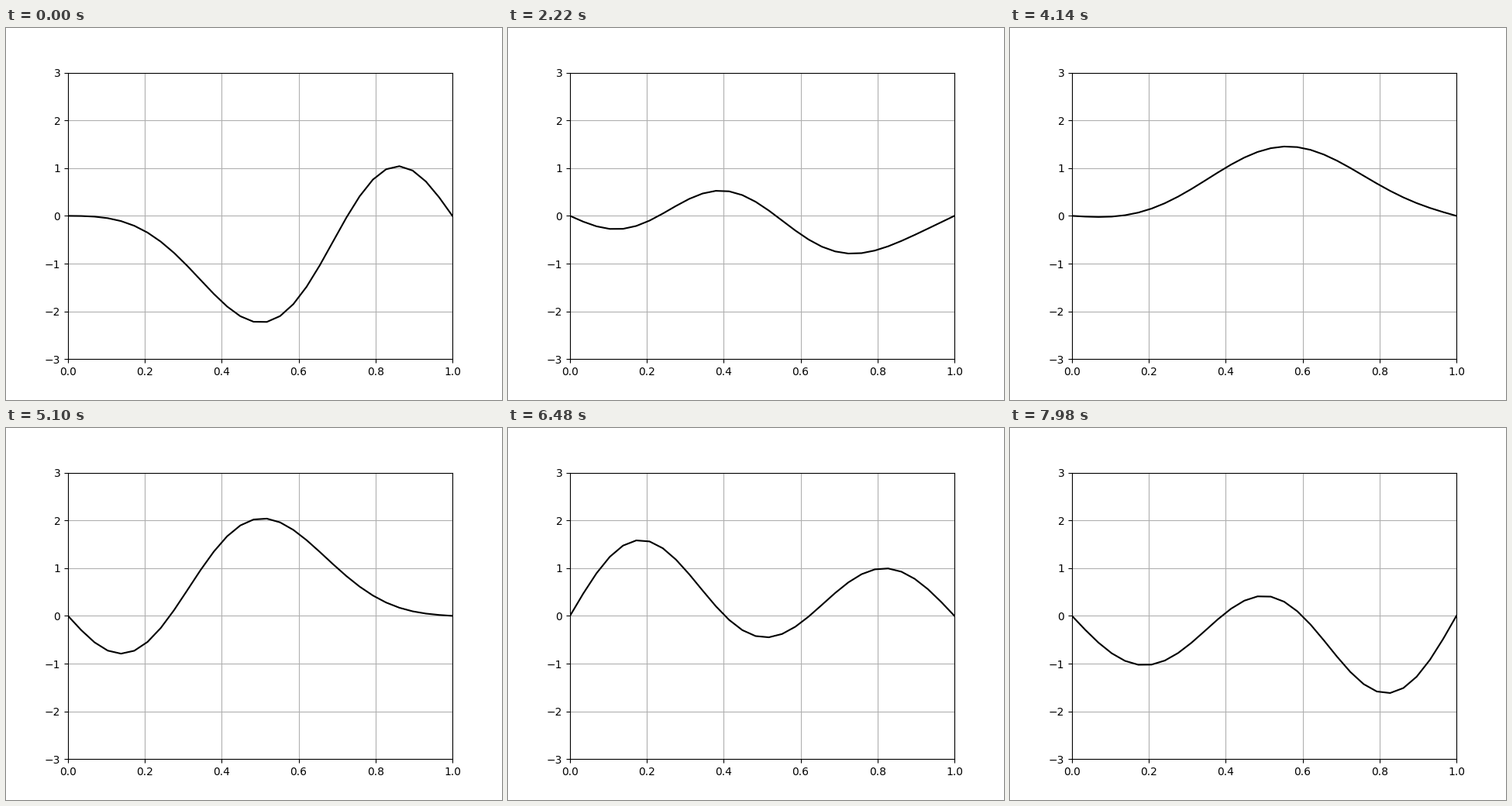
A matplotlib script that plays this animation: 640 px wide and 480 px high, repeating every 8000 ms.

```python
import numpy as np
import matplotlib.pyplot as plt
from matplotlib.animation import FuncAnimation

LOOP_MS = 8000
TICK_MS = 20
STEP_MS = 60        # the string moves once per step
PERIOD_MS = 9600    # period of the fundamental

modes = np.arange(1, 5)
amps = np.array([-1.22, -0.45, 1.015, -0.235])
x = np.linspace(0, 1, 30)
shapes = np.sin(np.pi * np.outer(modes, x))


def string(ms):
    """Displacement of the vibrating string as a sum of standing waves."""
    phase = 2 * np.pi * ms / PERIOD_MS
    return (amps * np.cos(modes * phase)) @ shapes


fig, ax = plt.subplots(figsize=(6.4, 4.8), dpi=100)
ax.set_xlim(0, 1)
ax.set_ylim(-3, 3)
ax.grid(True)
line, = ax.plot(x, string(0), "k-", lw=1.5)


def update(i):
    line.set_ydata(string(i * TICK_MS // STEP_MS * STEP_MS))
    return line,


anim = FuncAnimation(fig, update, frames=LOOP_MS // TICK_MS,
                     interval=TICK_MS, repeat=True, repeat_delay=0)
plt.show()
```
